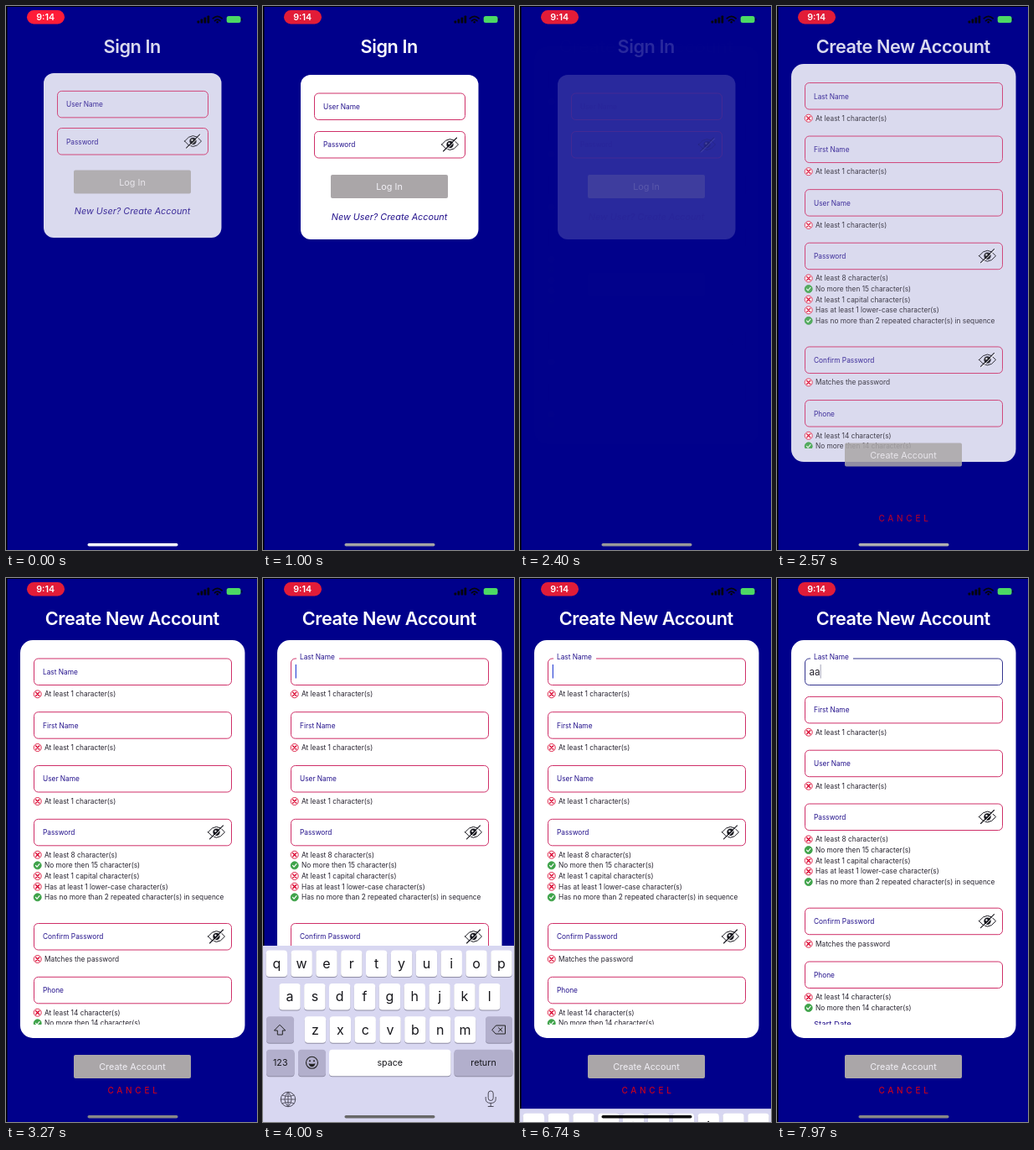
An HTML page with a canvas for the animation above (8 s loop, 300 by 648 pixels).

```html
<!DOCTYPE html>
<html lang="en">
<head>
<meta charset="utf-8">
<style>
  html, body { margin: 0; width: 100%; height: 100%; overflow: hidden; background: #00008b; }
  canvas { display: block; width: 300px; height: 648px; }
</style>
</head>
<body>
<canvas id="stage"></canvas>
<script>
const LOOP = 8000;
const NAVY = '#00008b', LABEL = '#24128c', INK = '#26222e', RED = '#dc143c', GREEN = '#3fa34a';
const FONT = 'Inter, Roboto, sans-serif';
// Moments of the story, in ms.
const ENTER_SIGN_IN = -170, LEAVE_SIGN_IN = 2300, ENTER_CREATE = 2400;
const FOCUS = 3380, KEYS_UP = 3420, KEYS_DOWN = 6510, TYPED = [7200, 7450];

const canvas = document.getElementById('stage');
const c = canvas.getContext('2d');
const scale = window.devicePixelRatio || 1;
canvas.width = 300 * scale;
canvas.height = 648 * scale;

const progress = (t, start, length) => Math.min(1, Math.max(0, (t - start) / length));
const easeOut = u => 1 - (1 - u) ** 3;
// Remaining layout shift after a page enters; 1 at 170 ms.
const settling = (t, start) => (1 - progress(t, start, 400)) ** 3 / 0.19;

function track(t, points) {
  let i = 1;
  while (i < points.length - 1 && t > points[i][0]) i++;
  const [t0, v0] = points[i - 1], [t1, v1] = points[i];
  return v0 + (v1 - v0) * progress(t, t0, t1 - t0);
}

function box(x, y, w, h, r, fill, stroke, line = 1) {
  c.beginPath();
  c.roundRect(x, y, w, h, r);
  if (fill) { c.fillStyle = fill; c.fill(); }
  if (stroke) { c.strokeStyle = stroke; c.lineWidth = line; c.stroke(); }
}

function text(str, x, y, size, color, { align = 'left', style = '', spacing = 0 } = {}) {
  c.font = `${style} ${size}px ${FONT}`;
  c.letterSpacing = spacing + 'px';
  c.textAlign = align;
  c.textBaseline = 'alphabetic';
  c.fillStyle = color;
  c.fillText(str, x, y + size * 0.36);
}

function drawPath(d, x, y, color, width = 1, fill) {
  c.save();
  c.translate(x, y);
  c.lineCap = c.lineJoin = 'round';
  const p = new Path2D(d);
  if (fill) { c.fillStyle = fill; c.fill(p); }
  if (color) { c.strokeStyle = color; c.lineWidth = width; c.stroke(p); }
  c.restore();
}

function disc(x, y, r, fill, stroke, width = 1) {
  c.beginPath();
  c.arc(x, y, r, 0, Math.PI * 2);
  if (fill) { c.fillStyle = fill; c.fill(); }
  if (stroke) { c.strokeStyle = stroke; c.lineWidth = width; c.stroke(); }
}

function eye(x, y) {
  drawPath('M-10 0Q0 -13 10 0Q0 13 -10 0Z', x, y, '#15151c', 1);
  disc(x, y, 4.2, '#15151c');
  disc(x - 1, y - 1.2, 1.2, '#fff');
  drawPath('M-8 8L8 -8', x + 1, y + 1, '#fff', 1);
  drawPath('M-8 8L8 -8', x, y, '#15151c', 1.1);
}

function field(x, y, w, label, { secret, float = 0, valid } = {}) {
  box(x + 0.5, y, w, 31.5, 5, null, valid ? '#34348f' : '#cf2f68');
  if (float > 0.5) { c.fillStyle = '#fff'; c.fillRect(x + 7, y - 2, 51, 4); }
  text(label, x + 11, y + 16 - 17.7 * float, 8.3, LABEL);
  if (secret) eye(x + w - 17.5, y + 15.5);
}

function rule(y, label, ok) {
  disc(37.7, y, 4.5, ok ? GREEN : '#fff', ok ? GREEN : RED, 0.9);
  if (ok) drawPath('M-2.2 0L-.6 1.8L2.3 -1.7', 37.7, y, '#fff', 1.2);
  else drawPath('M-2 -2L2 2M2 -2L-2 2', 37.7, y, RED, 1.6);
  text(label, 46, y, 8.3, INK);
}

function button(y, label) {
  box(81, y, 140, 28, 2, '#aaa6a8');
  text(label, 151, y + 14.3, 10.8, '#f1eff5', { align: 'center' });
}

function title(str) {
  text(str, 150.7, 48.5, 21.7, '#fff', { align: 'center', style: '600', spacing: -0.45 });
}

function signIn(t) {
  const k = settling(t, ENTER_SIGN_IN);
  const at = y => y - k * (2 + (y - 82) * 0.03);
  c.globalAlpha = progress(t, ENTER_SIGN_IN, 200) * (1 - progress(t, LEAVE_SIGN_IN, 120));
  title('Sign In');
  box(45, 82 - 2 * k, 212.5, 196, 12, '#fff');
  field(61, at(104), 180, 'User Name');
  field(61, at(149.5), 180, 'Password', { secret: true });
  button(at(201), 'Log In');
  text('New User? Create Account', 151, at(251.5), 10.8, LABEL, { align: 'center', style: 'italic' });
  c.globalAlpha = 1;
}

function createAccount(t) {
  const k = settling(t, ENTER_CREATE);
  const typed = TYPED.filter(time => t >= time).length;
  const lift = 18.3 * easeOut(progress(t, TYPED[0], 200));
  const at = y => y - k * (4.5 + (y - 96) * 0.0035) - (y > 130 ? lift : 0);
  const line = (y, label, options) => field(33, at(y), 236, label, options);

  c.globalAlpha = progress(t, ENTER_CREATE, 200);
  title('Create New Account');
  const top = 74 - 5 * k;
  box(17, top, 268.5, 474, 15, '#fff');

  c.save();
  c.beginPath();
  c.rect(17, top, 268.5, 458);
  c.clip();
  line(96, 'Last Name', { float: easeOut(progress(t, FOCUS, 180)), valid: typed > 0 });
  if (!typed) rule(at(138.3), 'At least 1 character(s)');
  line(159.7, 'First Name');
  rule(at(202), 'At least 1 character(s)');
  line(223.5, 'User Name');
  rule(at(266), 'At least 1 character(s)');
  line(287.3, 'Password', { secret: true });
  [
    ['At least 8 character(s)', false],
    ['No more then 15 character(s)', true],
    ['At least 1 capital character(s)', false],
    ['Has at least 1 lower-case character(s)', false],
    ['Has no more than 2 repeated character(s) in sequence', true]
  ].forEach(([label, ok], i) => rule(at(329.7 + 12.65 * i), label, ok));
  line(411.5, 'Confirm Password', { secret: true });
  rule(at(454), 'Matches the password');
  line(475.3, 'Phone');
  rule(at(517.7), 'At least 14 character(s)');
  rule(at(530.3), 'No more then 14 character(s)', true);
  text('Start Date', 44, at(549.5), 9.5, LABEL);

  const entry = 'a'.repeat(typed);
  text(entry, 38.5, 112, 11.6, INK);
  if (t > FOCUS + 60) {
    const phase = (t - 3450 + 1060) % 1060;
    c.globalAlpha *= 1 - progress(phase, 600, 80) + progress(phase, 980, 80);
    c.fillStyle = typed ? '#8a8aa6' : '#3f55d8';
    c.fillRect(38.7 + c.measureText(entry).width, 103, typed ? 0.8 : 1.3, 16.5);
  }
  c.restore();

  button(568 - 48 * k, 'Create Account');
  text('CANCEL', 121.5, 610.5, 10, '#c4001f', { style: '500', spacing: 3.7 });
  c.globalAlpha = 1;
}

function key(x, y, w, label, { size = 10.7, special } = {}) {
  box(x, y + 1, w, 31.5, 4, '#8f8da5');
  box(x, y, w, 31.5, 4, special ? '#b2afcc' : '#fff');
  text(label, x + w / 2, y + 15.7, size, '#17171c', { align: 'center' });
}

function keyboard(t) {
  const shown = easeOut(progress(t, KEYS_UP, 400)) - easeOut(progress(t, KEYS_DOWN, 400));
  if (shown <= 0) return;
  c.save();
  c.translate(0, 210 * (1 - shown));
  c.fillStyle = '#d8d7f1';
  c.fillRect(0, 438, 300, 210);
  [['qwertyuiop', 16.3, 443.5], ['asdfghjkl', 32, 483], ['zxcvbnm', 62.5, 522.3]].forEach(([row, x, y]) =>
    [...row].forEach((letter, i) => key(x - 12.7 + i * 29.85, y, 25.4, letter, { size: 16 })));

  const special = { special: true };
  key(4, 522.3, 33, '', special);
  drawPath('M0 -6L6.5 .5H3V5.5H-3V.5H-6.5Z', 20.3, 538.5, '#222', 1);
  key(266, 522.3, 32, '', special);
  drawPath('M-8 0L-3.5 -5H7.5V5H-3.5ZM-.5 -2.2L4 2.2M4 -2.2L-.5 2.2', 282, 538, '#222', 1);
  key(4, 561.7, 33.5, '123', special);
  key(42, 561.7, 33, '', special);
  disc(58.5, 577.3, 7, null, '#222', 1.1);
  disc(56, 575.3, 1, '#222');
  disc(61, 575.3, 1, '#222');
  drawPath('M-4 1Q0 2 4 1Q3 5 0 5Q-3 5 -4 1Z', 58.5, 577.3, null, 1, '#222');
  key(79, 561.7, 145.5, 'space');
  key(228.5, 561.7, 70, 'return', special);

  const grey = '#4c4a58';
  disc(30, 621, 8.7, null, grey);
  drawPath('M-8.7 0H8.7M0 -8.7V8.7M0 -8.7Q-8.5 0 0 8.7M0 -8.7Q8.5 0 0 8.7M-7 -5Q0 -2 7 -5M-7 5Q0 2 7 5', 30, 621, grey, 0.9);
  box(269.2, 611, 6, 11.5, 3, null, grey);
  drawPath('M-6 -2V0Q-6 5 0 5Q6 5 6 0V-2M0 5V9M-3 9H3', 272.2, 620.5, grey, 1);
  c.restore();
}

function statusBar(t) {
  const glow = track(t, [[0, 255], [900, 226], [4700, 226], [5500, 255], [5700, 255], [6500, 224], [8000, 224]]);
  box(25, 5, 45, 16.5, 8.2, `rgb(${glow}, 28, 56)`);
  text('9:14', 47.2, 13.5, 10.7, '#fff', { align: 'center', style: '600' });
  const black = '#05050d';
  for (let i = 0; i < 4; i++) box(228.5 + i * 4, 17.5 - i * 2, 2.7, 3 + i * 2, 0.7, black);
  drawPath('M-5.5 -2.5Q0 -7.5 5.5 -2.5M-3.2 .3Q0 -2.6 3.2 .3', 252.7, 17.3, black, 1.7);
  disc(252.7, 19.3, 1.3, black);
  box(263.7, 12, 16.8, 8, 2.5, '#4cd964');
  box(281.3, 14.5, 1, 3, 0.5, black);
}

function homeIndicator(t) {
  const shade = track(t, [[0, 255], [300, 250], [1200, 140], [2300, 140], [2570, 175], [2900, 140],
    [3900, 130], [4300, 28], [5000, 20], [6740, 5], [7000, 20], [7500, 135], [8000, 135]]);
  box(97.5, 640, 108, 3.6, 1.8, `rgb(${shade}, ${shade}, ${shade})`);
}

function draw(t) {
  c.setTransform(scale, 0, 0, scale, 0, 0);
  c.fillStyle = '#000';
  c.fillRect(0, 0, 300, 648);
  c.fillStyle = NAVY;
  c.fillRect(1.5, 1, 298.5, 647);
  if (t < LEAVE_SIGN_IN + 120) signIn(t);
  if (t > ENTER_CREATE) createAccount(t);
  keyboard(t);
  statusBar(t);
  homeIndicator(t);
}

const begin = performance.now();
function frame() {
  draw((performance.now() - begin) % LOOP);
  requestAnimationFrame(frame);
}
frame();
</script>
</body>
</html>
```
